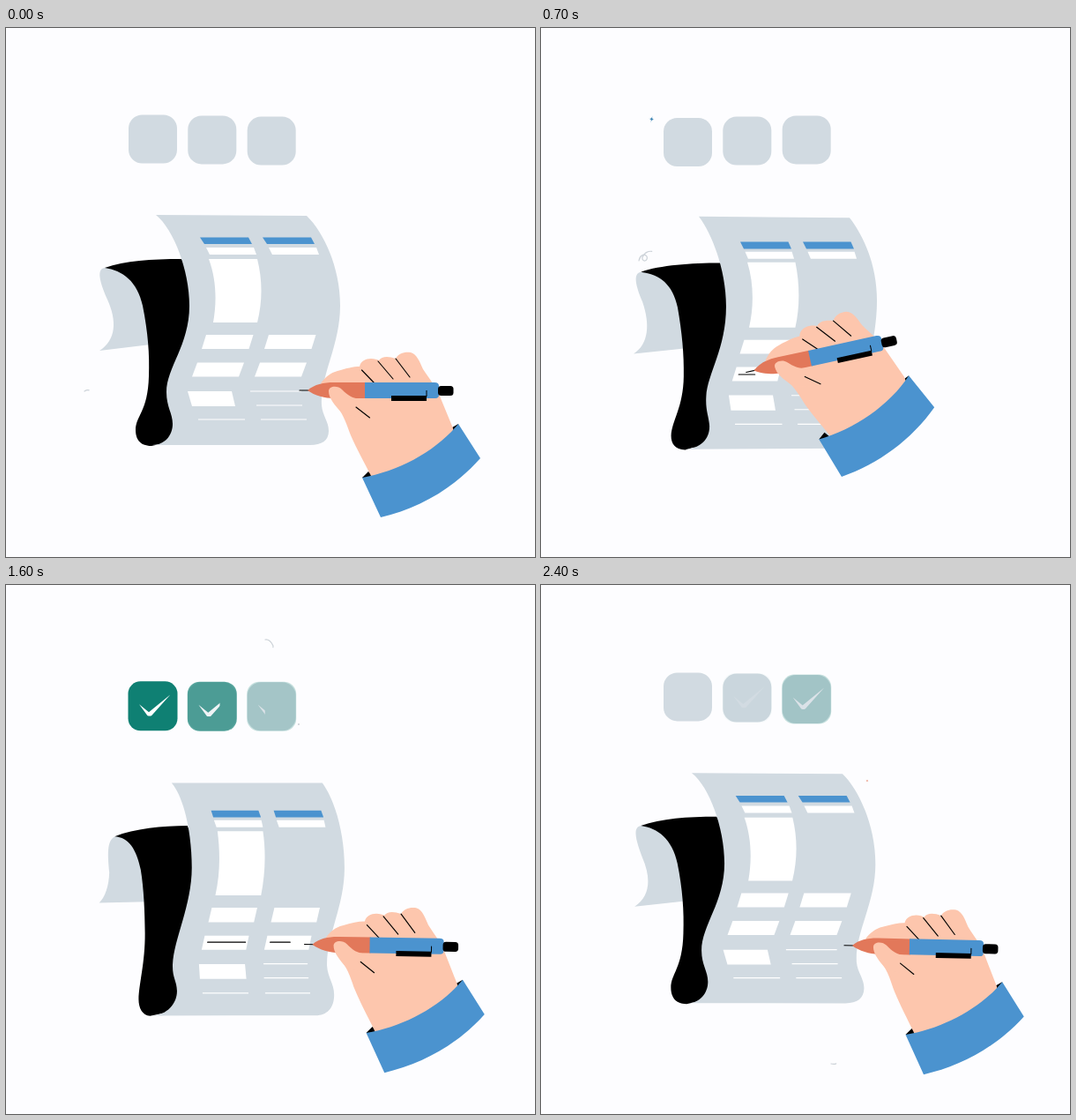
Animation, 600 px wide and 600 px high, one loop 2500 ms. Source, as an HTML page:

```html
<!DOCTYPE html>
<html lang="en">
<head>
<meta charset="utf-8">
<title>Signing a form</title>
<style>
  html, body { margin: 0; width: 100%; height: 100%; overflow: hidden; background: #fdfdff; }
  svg { display: block; width: 100%; height: 100%; }
  .skin { fill: #fdc6ad; }
  .blue { fill: #4b93cf; }
  .ink { fill: none; stroke: #000; stroke-width: 1.15; stroke-linecap: round; }
  .curl { fill: none; stroke: #ccd2d8; stroke-width: 1.2; stroke-linecap: round; }
</style>
</head>
<body>
<svg id="stage" viewBox="0 0 600 600">
  <g id="tiles"></g>
  <g id="doodles"></g>
  <g id="paper"></g>
  <!-- drawn with the nib at 333,411 -->
  <g id="hand">
    <path class="cuff" d="M404 510L411 503L422 514ZM501 456L513 449L512 462Z"/>
    <path class="skin" d="M357 403C362 396 368 391 376 389C386 386 394 384 401 384C402 378 408 375 414 375C418 375 421 376 423 377C426 372 434 372 442 375C445 369 452 367 459 368C466 370 469 378 473 387C480 398 489 408 493 420L507 454L508 460C485 490 450 507 417 514L413 506C407 494 398 478 391 462C387 452 384 440 374 427L370 412Z"/>
    <path class="blue cuff" d="M404 510C445 503 488 480 513 449L538 488C508 522 468 545 425 555Z"/>
    <path class="ink" d="M403.500 388L418 403M422 378L439 398M442 375L458 396"/>
    <path class="ink" d="M333 411H345"/>
    <path fill="#e2785a" d="M342 411C350 404 360 402 372 402H408V420H372C362 420 350 417 342 411Z"/>
    <path class="blue" d="M407 402H486Q491 402 491 406V416Q491 420 487 420H407Z"/>
    <path d="M437 417H477V423H437ZM476.500 411H477.500V418H476.500Z"/>
    <rect x="490" y="406" width="17.500" height="11" rx="3.500"/>
    <path class="skin" d="M366 412C366 406 376 405 381 410C388 417 393 420 402 421V442L382 438C373 428 366 420 366 412Z"/>
    <path class="ink" d="M397 430L412.500 442"/>
  </g>
</svg>
<script>
const LOOP = 2500, STEP = 100, TAU = 2 * Math.PI;
const GRAY = '#d1dae1', WHITE = '#fff', BLUE = '#4b93cf', GREEN = '#0f8073', CORAL = '#e2785a';
const byId = id => document.getElementById(id);

function add(parent, tag, attrs) {
  const el = document.createElementNS('http://www.w3.org/2000/svg', tag);
  for (const k in attrs) el.setAttribute(k, attrs[k]);
  return parent.appendChild(el);
}
const clamp = v => Math.max(0, Math.min(1, v));
const ramp = (t, start, span) => clamp((t - start) / span);
const wave = (t, low) => -Math.cos(TAU * (t - low) / LOOP);
const trim = (el, p) => {
  el.setAttribute('stroke-dasharray', `${p} 3`);
  el.style.visibility = p > 0.01 ? 'visible' : 'hidden';
};

// Paper: every point swings on one sine wave, fixed by its pose at three times.
const POSE_TIMES = [0, 1000, 1800];
const parts = [];

function part(attrs, poses, dx = 0) {
  const el = add(byId('paper'), 'path', { ...attrs, transform: `translate(${dx})` });
  const nums = poses.map(d => d.match(/-?[\d.]+/g).map(Number));
  parts.push({ el, nums, shape: poses[0] });
  return el;
}
const pair = (attrs, poses) => [0, 71].map(dx => part(attrs, poses, dx));

function poseWeights(t) {
  const s = (a, b) => Math.sin(Math.PI * (a - b) / LOOP);
  return POSE_TIMES.map((own, i) => POSE_TIMES.reduce(
    (w, other, j) => i === j ? w : w * s(t, other) / s(own, other), 1));
}
function drawPaper(t) {
  const w = poseWeights(t);
  for (const { el, nums, shape } of parts) {
    let i = 0;
    el.setAttribute('d', shape.replace(/-?[\d.]+/g, () => {
      const v = nums.reduce((sum, n, k) => sum + n[i] * w[k], 0);
      i++;
      return ' ' + v.toFixed(2);
    }));
  }
}

// back flap, dark underside, front sheet
part({ fill: GRAY }, [
  'M113 272C100 272 109 294 115 308C126 332 125 354 106 366L164 359L170 282L140 268Z',
  'M119 282C108 284 112 302 116 318C120 340 117 358 105 367L163 363L175 290L146 277.500Z',
  'M123 283C112 286 115 306 117 324C118 340 114 353 106 360L160 358L175 290L150 277.500Z']);
part({ fill: '#000' }, [
  'M112 272C135 264 165 262 199 262L222 300L190 413L198 449L190 470L172 472.5L165 474C151 474 147 465 147 456C147 440 161 435 162 395C163 370 161 345 155 315C149 287 132 275 112 272Z',
  'M118 282C140 274 175 271 206 271L225 310L197 425L202 455L194 478L172 482L163 484.500C153 484 149 477 149 468C150 450 160 428 160 395C160 370 158 345 154 320C149 296 138 284 118 282Z',
  'M122 283C145 274 175 271 204 271L224 315L195 428L202 459L194 480L172 485L164 486.500C154 486 150 477 150 467C150 450 158 430 158 395C158 370 157 345 153 322C148 298 138 284 122 283Z']);
part({ fill: GRAY }, [
  'M170 212L341 213C359 230 379 270 379 315C379 360 356 395 358 428C359 440 366 446 366 457C366 468 358 473 345 473L166 473C180 473 189 462 189 449C189 437 182 430 182 413C182 385 208 360 208 315C208 275 190 228 170 212Z',
  'M186 219L357 220C372 242 383 275 383 312C383 360 366 400 366 435C366 448 371 454 371 465C371 477 362 483 350 483L163 484C183 483 194 470 193 455C192 444 189 440 190 425C192 398 211 365 211 318C211 280 200 240 186 219Z',
  'M184 223L355 223C371 243 383 283 383 322C383 365 361 395 362 430C363 443 371 450 371 463C371 478 363 486 350 486L165 486C183 486 193 472 193 459C193 447 187 444 187 428C188 398 210 362 210 320C210 282 200 238 184 223Z']);

// form fields
pair({ fill: BLUE }, ['M220 237.500h55l4 7.500h-54z', 'M231 250h54l3 8h-54z', 'M230 253h54l3 7.500h-54z']);
pair({ fill: WHITE }, ['M227 249h54l3 8h-53z', 'M235 261h53l2 8h-52z', 'M234 264h54l2 8h-53z']);
part({ fill: WHITE }, [
  'M230 262h55c6 24 6 48 0 72h-50c4 -22 4 -48 -5 -72z',
  'M238 273h53c4 24 4 50 -1 74h-53c6 -24 6 -50 1 -74z',
  'M238 277h52c4 24 3 48 -2 72h-51c5 -24 5 -48 1 -72z']);
pair({ fill: WHITE }, ['M227 348h53.500l-5 16h-53.500z', 'M233 361h51.500l-4 16h-52z', 'M232 363h52l-4 16.500h-52z']);
pair({ fill: WHITE }, ['M217 379.500h53l-6 16h-53z', 'M225 392h49.500l-3 16h-50.500z', 'M223.500 395h51l-4 16h-51z']);
part({ fill: WHITE }, ['M206 412h50l4 17h-49z', 'M218 424h51l2 17h-52z', 'M216 427.500h52l2 16.500h-52z']);
part({ stroke: '#fff', 'stroke-width': 1.2 }, [
  'M218 444h53M277 412h58M284 428h52M289 444h52',
  'M222 457h53M290 424h50M291 440h50M293 457h52',
  'M222 460h52M289 427h52M291 443h51M293 460h51']);
const strokes = pair({ class: 'ink', pathLength: 1 }, ['M219 388h42', 'M228 400h42', 'M226.500 402.500h43']);

function drawStrokes(t) {
  strokes.forEach((el, i) => {
    trim(el, ramp(t, [500, 1400][i], [450, 380][i]));
    el.setAttribute('opacity', 1 - ramp(t, 2050, 250));
  });
}

// Tiles
const tiles = [139, 206.300, 273.700].map(x => {
  const g = add(byId('tiles'), 'g', {});
  add(g, 'rect', { width: 55, height: 55, rx: 15.5, fill: GRAY });
  const done = add(g, 'g', {});
  add(done, 'rect', { x: -0.5, y: -0.5, width: 56, height: 56, rx: 14, fill: GREEN });
  const tick = add(done, 'path', { fill: WHITE, d: 'M12 25.500L23 34.500L47.500 14.500L26 38.500Q24 39.500 21.500 38.500Z' });
  return { x, g, done, tick };
});
function drawTiles(t) {
  tiles.forEach(({ x, g, done, tick }, i) => {
    g.setAttribute('transform', `translate(${x} ${104 + 6.3 * wave(t, 200 + 100 * i)})`);
    const shown = ramp(t, 1350 + 100 * i, 220);
    done.setAttribute('opacity', shown * (1 - ramp(t, 2200 + 35 * i, 170)));
    tick.style.clipPath = `inset(0 ${100 - 100 * shown}% 0 0)`;
  });
}

// Doodles: grow and shrink back, each at its own start times
const doodles = [];
function curl(d, ...starts) {
  const el = add(byId('doodles'), 'path', { class: 'curl', pathLength: 1, d });
  doodles.push({ starts, show: p => trim(el, p) });
}
const STAR = 'M0 -1C.02 -.15 .15 -.02 1 0C.15 .02 .02 .15 0 1C-.02 .15 -.15 .02 -1 0C-.15 -.02 -.02 -.15 0 -1Z';
function spark(x, y, size, turn, fill, ...starts) {
  const el = add(byId('doodles'), 'path', { d: STAR, fill });
  doodles.push({ starts, show: p =>
    el.setAttribute('transform', `translate(${x} ${y}) rotate(${turn}) scale(${size * p})`) });
}
curl('M111 264C112 258 117 255 120 259C122 265 114 266 115 260C117 254 124 252 128 254', 480, 1780);
curl('M329 543C336 545 339 540 336 535C331 529 325 534 330 538C337 543 348 532 346 524C344 520 338 524 340 528', 970, 2050);
curl('M294 62C297 61 301 64 303 69C303 76 296 77 297 70C299 61 314 58 314 73', 1270);
curl('M89 412C95 408 99 414 94 416C89 416 90 408 97 408L101 410', 2480);
spark(125.5, 103.5, 8.5, 12, '#3f86b5', 400, 1710);
spark(370, 222, 11, 38, CORAL, 910, 2060);
spark(332, 158, 6.5, 45, '#aab0b6', 1270);

function drawDoodles(t) {
  for (const { starts, show } of doodles) {
    const p = Math.max(...starts.map(s =>
      Math.sin(Math.PI * clamp((t - s + LOOP) % LOOP / 360))));
    show(p < 0.01 ? 0 : p);
  }
}

// Hand: time, nib x, nib y, angle
const HAND = [
  [-150, 345, 408, 1.3], [0, 333, 411, 0], [500, 223, 390, -14.5], [1000, 264, 394, -5.8],
  [1200, 292, 404, -2.2], [1400, 299, 405.5, -1.7], [1700, 349, 408, 1.5], [1800, 345, 408, 1.3],
  [2350, 345, 408, 1.3], [2500, 333, 411, 0], [3000, 223, 390, -14.5]
];
const cuffs = document.querySelectorAll('.cuff');

function slope(i, k) {
  const a = HAND[i - 1], b = HAND[i], c = HAND[i + 1];
  if (!a || !c || (b[k] - a[k]) * (c[k] - b[k]) <= 0) return 0;
  return (c[k] - a[k]) / (c[0] - a[0]);
}
function handAt(t, k) {
  const i = HAND.findIndex(key => key[0] > t) - 1;
  const a = HAND[i], b = HAND[i + 1], h = b[0] - a[0], u = (t - a[0]) / h, v = 1 - u;
  return a[k] * v * v * (1 + 2 * u) + b[k] * u * u * (1 + 2 * v)
    + h * u * v * (v * slope(i, k) - u * slope(i + 1, k));
}
function drawHand(t) {
  const [x, y, turn] = [1, 2, 3].map(k => handAt(t, k));
  byId('hand').setAttribute('transform', `translate(${x} ${y}) rotate(${turn}) translate(-333 -411)`);
  // the wrist bends, so the sleeve turns half as far
  cuffs.forEach(el => el.setAttribute('transform', `rotate(${-turn / 2} 467 446)`));
}

// The picture advances in steps; a short lead keeps the step edges steady.
const began = performance.now();
let last = -1;
function tick() {
  const t = Math.floor((performance.now() - began + 10) / STEP) * STEP % LOOP;
  if (t !== last) {
    [drawPaper, drawStrokes, drawTiles, drawDoodles, drawHand].forEach(draw => draw(t));
    last = t;
  }
  requestAnimationFrame(tick);
}
tick();
</script>
</body>
</html>
```
